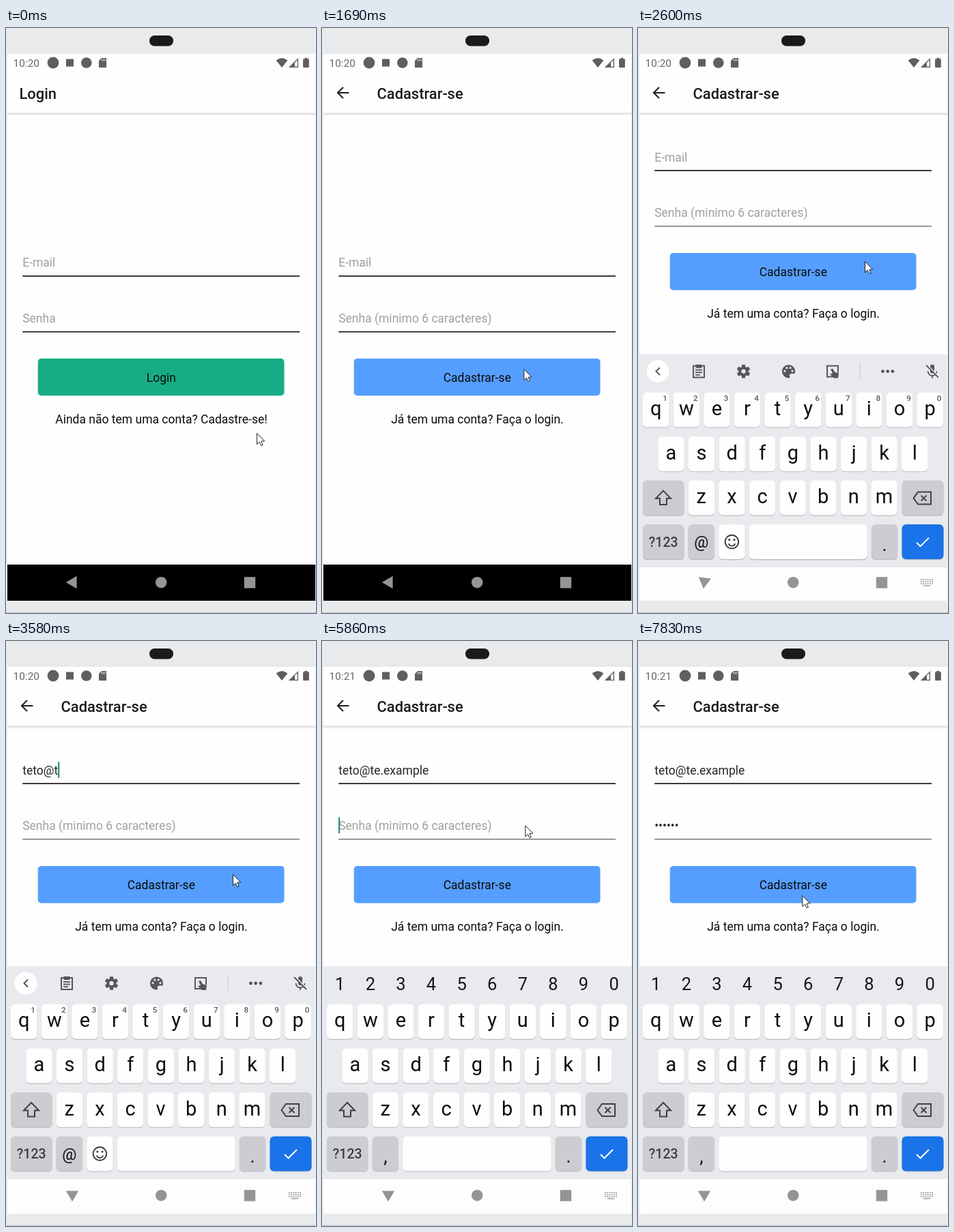
An HTML page with a canvas that plays this animation: 454x858 px, repeating every 8000 ms.

```html
<!DOCTYPE html>
<html lang="pt">
<head>
<meta charset="utf-8">
<title>Login</title>
<style>
html, body { margin: 0; width: 100%; height: 100%; overflow: hidden; background: #e9eaec; }
canvas { display: block; width: 454px; height: 858px; }
</style>
</head>
<body>
<canvas id="stage"></canvas>
<script>
const W = 454, H = 858, LOOP = 8000;
const dpr = window.devicePixelRatio || 1;
const stage = document.getElementById('stage');
const sheet = document.createElement('canvas');
for (const el of [stage, sheet]) { el.width = W * dpr; el.height = H * dpr; }
const main = stage.getContext('2d');
const off = sheet.getContext('2d');
let c = main;

const EMAIL = 'teto@te.example';
const emailKeys = [2760, 2950, 2980, 3150, 3390, 3580, 3760, 3910, 4050, 4120, 4190, 4630, 4730, 4830, 4930];
const passKeys = [6110, 6300, 6440, 6590, 6770, 6870];
const PUSH = 1189, FOCUS = 2020, KEYS_IN = 2510, RELAYOUT = 2570;
const TO_PASS = 5640, NUM_ROW = 5780, CLOCK = 5500, MASK = 7600;
const GREY = '#54565a';

const clamp = x => Math.max(0, Math.min(1, x));
const span = (t, a, b) => clamp((t - a) / (b - a));
const mix = (a, b, p) => a + (b - a) * p;
const inOut = x => x < .5 ? 2 * x * x : 1 - 2 * (1 - x) * (1 - x);
const typed = (keys, t) => keys.filter(k => t >= k).length;

function bezier(x, x1, y1, x2, y2) {
  const at = (s, a, b) => 3 * (1 - s) * (1 - s) * s * a + 3 * (1 - s) * s * s * b + s * s * s;
  let lo = 0, hi = 1;
  for (let i = 0; i < 24; i++) {
    const s = (lo + hi) / 2;
    if (at(s, x1, x2) < x) lo = s; else hi = s;
  }
  return at(lo, y1, y2);
}

// Drawing helpers
function rect(x, y, w, h, fill) { c.fillStyle = fill; c.fillRect(x, y, w, h); }
function round(x, y, w, h, r, fill) {
  c.beginPath(); c.roundRect(x, y, w, h, r);
  c.fillStyle = fill; c.fill();
}
function disc(x, y, r, fill) {
  c.beginPath(); c.arc(x, y, r, 0, 7);
  c.fillStyle = fill; c.fill();
}
function trace(pts, closed) {
  c.beginPath();
  for (let i = 0; i < pts.length; i += 2) c.lineTo(pts[i], pts[i + 1]);
  if (closed) c.closePath();
}
function poly(pts, fill) { trace(pts, true); c.fillStyle = fill; c.fill(); }
function line(pts, color, width, closed) {
  trace(pts, closed);
  c.strokeStyle = color; c.lineWidth = width; c.stroke();
}
function text(s, x, y, size, fill, align = 'left', weight = 400) {
  c.font = `${weight} ${size}px Roboto, sans-serif`;
  c.textAlign = align; c.fillStyle = fill;
  c.fillText(s, x, y);
  return c.measureText(s).width;
}
function at(x, y, draw, angle = 0) {
  c.save(); c.translate(x, y); c.rotate(angle); draw(); c.restore();
}
// Draws a group with one shared opacity.
function layer(alpha, scale, dy, draw) {
  if (alpha <= 0) return;
  off.setTransform(dpr, 0, 0, dpr, 0, 0);
  off.clearRect(0, 0, W, H);
  off.translate(227.5, 412.5 + dy);
  off.scale(scale, scale);
  off.translate(-227.5, -412.5);
  c = off; draw(); c = main;
  c.globalAlpha = alpha;
  c.drawImage(sheet, 0, 0, W, H);
  c.globalAlpha = 1;
}

// App screens
function header(title, back) {
  rect(2, 38, 451, 749, '#fefefe');
  const g = c.createLinearGradient(0, 124.5, 0, 129);
  g.addColorStop(0, '#d9d9d9'); g.addColorStop(1, '#fefefe');
  rect(2, 124.5, 451, 4.5, g);
  text(title, back ? 80.5 : 19.5, 103.5, 21.9, '#1b1b1d', 'left', 500);
  if (back) {
    line([23, 95, 39.5, 95], '#222', 2.1);
    line([31, 87, 23, 95, 31, 103], '#222', 2.1);
  }
}
function field(value, hint, y, caret) {
  const w = value ? text(value, 24.2, y, 17.5, '#262626') : (text(hint, 24.2, y, 17.5, '#a0a0a0'), 0);
  if (caret) rect(24.2 + w, y - 18.3, 2, 23.5, '#16877a');
}
function form(dy, button, color, link, linkAlpha) {
  rect(24.3, 363 + dy, 405.7, 1.6, '#0c0c0c');
  rect(24.3, 444.8 + dy, 405.7, dy ? 1.2 : 1.6, dy ? '#5a5a5a' : '#0c0c0c');
  round(46.7, 484.8 + dy, 360.8, 54.4, 5, color);
  text(button, 227.3, 519 + dy, 17.5, '#0b0b0b', 'center');
  text(link, 227.5, 580 + dy, 17.5, `rgba(12,12,12,${linkAlpha})`, 'center');
}
function loginScreen(t) {
  const fade = t < PUSH
    ? mix(1, .2, inOut(span(t, 910, 1060)))
    : mix(.2, 1, inOut(span(t, PUSH, PUSH + 250)));
  header('Login', false);
  field('', 'E-mail', 350.2, false);
  field('', 'Senha', 431.5, false);
  form(0, 'Login', '#17ad84', 'Ainda não tem uma conta? Cadastre-se!', fade);
}
function signupScreen(t) {
  const dy = t >= RELAYOUT ? -154.7 : 0;
  const n = typed(emailKeys, t), m = typed(passKeys, t);
  const pass = m ? '•'.repeat(m - 1) + (t >= MASK ? '•' : m) : '';
  const caretOff = (t >= 2600 && t < 2760) || (t >= 4470 && t < 4630) || t >= 7210;
  const caret = t >= FOCUS && !caretOff;
  header('Cadastrar-se', true);
  field(EMAIL.slice(0, n), 'E-mail', 350.2 + dy, caret && t < TO_PASS);
  field(pass, 'Senha (minimo 6 caracteres)', 431.5 + dy, caret && t >= TO_PASS);
  form(dy, 'Cadastrar-se', '#559eff', 'Já tem uma conta? Faça o login.', 1);
  if (t >= 2470 && t < RELAYOUT) rect(2, 478, 451, 309, '#fefefe');
}
function app(t) {
  c.save();
  c.beginPath(); c.rect(2, 38, 451, 749); c.clip();
  rect(2, 38, 451, 749, '#fefefe');
  const p = bezier(span(t, PUSH, PUSH + 400), .35, .91, .33, .97);
  if (p < 1) layer(1 - span(p, .2075, 1), 1 + .1 * p, 0, () => loginScreen(t));
  layer(span(p, .75, .875), .85 + .15 * p, 0, () => signupScreen(t));
  c.restore();
}

// Device chrome
function frame() {
  rect(0, 0, W, H, '#e9eaec');
  round(210, 11, 35, 15.5, 7.5, '#1a1b1d');
  rect(0, 856.8, W, 1.2, '#c3c9d2');
}
function statusBar(t) {
  const ink = '#5f5f5f';
  text(t < CLOCK ? '10:20' : '10:21', 10.6, 57, 15.4, '#686868');
  disc(69, 51, 8.4, ink);
  rect(88, 45.5, 11, 11, ink);
  disc(117.8, 51, 7.8, ink);
  poly([140, 44, 147, 44, 147, 58, 136, 58, 136, 48], ink);
  for (let i = 0; i < 3; i++) rect(139.7 + i * 2.3, 45.5, 1.2, 3, '#ddd');
  c.beginPath(); c.moveTo(404, 58);
  c.lineTo(395.6, 47.6);
  c.quadraticCurveTo(404, 40.6, 412.4, 47.6);
  c.closePath(); c.fillStyle = ink; c.fill();
  line([415.5, 57.3, 427.3, 57.3, 427.3, 45.5], ink, 1.3, true);
  poly([414.5, 58, 423, 58, 423, 49.5], ink);
  round(435, 45.3, 8.8, 12.7, 1, ink);
  rect(437.4, 43.8, 4, 2, ink);
}
function navBar(t, light) {
  const ink = '#949494';
  const turn = 1 - Math.exp(-Math.max(0, t - 2530) / 28);
  at(97, 813, () => poly([-9.2, 0, 6.6, -9.2, 6.6, 9.2], ink), -Math.PI / 2 * turn);
  disc(227.2, 813.2, 8.3, ink);
  rect(348.8, 805.2, 16.4, 16.4, ink);
  if (t < KEYS_IN) return;
  const dim = light ? '#a6a6a6' : '#777';
  for (let r = 0; r < 3; r++)
    for (let i = 0; i < 6; i++) rect(414 + i * 3.2, 808 + r * 3, 1.9, 1.9, dim);
  rect(418, 817, 10, 1.6, dim);
}

// Keyboard
function key(x, y, w, fill = '#fefefe') {
  round(x, y + 1.1, w, 51, 6, '#b9bbbf');
  round(x, y, w, 51, 6, fill);
}
function letters(row, x, y, supers) {
  [...row].forEach((ch, i) => {
    const mid = x + i * 44.6;
    key(mid - 19.2, y, 38.4);
    text(ch, mid, y + 33.5, 29, '#0d0d0d', 'center');
    if (supers) text((i + 1) % 10, mid + 13.5, y + 12.5, 11.8, '#5a5c60', 'center', 500);
  });
}
function toolbar() {
  const y = 502;
  disc(29, y, 16.5, '#fefefe');
  line([32, y - 5.5, 26.5, y, 32, y + 5.5], GREY, 2);
  at(89, y, () => {
    line([-8, -8, 8, -8, 8, 9, -8, 9], GREY, 2, true);
    rect(-4.5, -10, 9, 5, GREY);
    for (let i = 0; i < 3; i++) rect(-5, -3 + i * 3.6, i < 2 ? 10 : 7, 1.8, GREY);
  });
  at(154.5, y, () => {
    for (let i = 0; i < 3; i++) {
      c.rotate(Math.PI / 3);
      round(-2.6, -9.8, 5.2, 19.6, 1, GREY);
    }
    disc(0, 0, 7.2, GREY);
    disc(0, 0, 3.2, '#e8eaed');
  });
  at(220.5, y, () => {
    disc(0, 0, 9.6, GREY);
    poly([2, 10, 1, 5, 5, 3, 10, 4, 7, 9], '#e8eaed');
    for (const [x, v] of [[-5.5, -.5], [-2.6, -5], [2.6, -5], [5.5, -.5]]) disc(x, v, 1.6, '#e8eaed');
  });
  at(285, y, () => {
    line([1, 8, -8, 8, -8, -8, 8, -8, 8, 2], GREY, 2);
    poly([-3, -3, 0, -4, 3, 1, 9, 3, 8, 10, 2, 10, -4, 4, 0, 3], GREY);
  });
  rect(324.6, 490, 1.2, 24, '#cdcfd3');
  for (let i = -1; i < 2; i++) disc(365.7 + i * 7.2, y, 2.4, GREY);
  at(431, y, () => {
    round(-3, -10, 6, 13, 3, GREY);
    c.beginPath(); c.arc(0, 0, 6.5, 0, Math.PI);
    c.strokeStyle = GREY; c.lineWidth = 1.8; c.stroke();
    rect(-.9, 6, 1.8, 4, GREY);
    line([-8, -10, 10, 8], '#e8eaed', 2);
    line([-9, -9, 9, 9], GREY, 2);
  });
}
function keyboard(t) {
  const nums = t >= NUM_ROW, dark = '#cccdd1';
  rect(2, 477, 451, 363, '#e8eaed');
  if (nums) [...'1234567890'].forEach((d, i) => text(d, 26.2 + i * 44.6, 512, 25.5, '#161616', 'center'));
  else toolbar();
  letters('qwertyuiop', 26.2, 532.8, !nums);
  letters('asdfghjkl', 48.5, 597.6, false);
  letters('zxcvbnm', 92.8, 662, false);
  key(7, 662, 60.5, dark);
  line([37, 677, 48, 688.5, 42, 688.5, 42, 697.5, 32, 697.5, 32, 688.5, 26, 688.5], '#3f4144', 2, true);
  key(386.5, 662, 61, dark);
  at(416.5, 688, () => {
    line([-13, 0, -6.5, -9, 12.5, -9, 12.5, 9, -6.5, 9], '#3f4144', 2, true);
    line([-2, -4, 6, 4], '#3f4144', 2);
    line([-2, 4, 6, -4], '#3f4144', 2);
  });
  key(7, 726.5, 60.5, dark);
  text('?123', 37.2, 759, 19.5, '#3c3e42', 'center', 500);
  key(73.6, 726.5, 38.4, dark);
  if (nums) {
    text(',', 92.8, 764.5, 27, '#0d0d0d', 'center');
    key(118.2, 726.5, 217.5);
  } else {
    text('@', 92.8, 760.5, 23.5, '#0d0d0d', 'center');
    key(118.2, 726.5, 38.4);
    at(137.4, 752, () => {
      c.strokeStyle = '#3f4144'; c.lineWidth = 1.9;
      c.beginPath(); c.arc(0, 0, 9.8, 0, 7); c.stroke();
      disc(-3.6, -3, 1.6, '#3f4144');
      disc(3.6, -3, 1.6, '#3f4144');
      c.beginPath(); c.arc(0, 1, 5, .3, Math.PI - .3); c.stroke();
    });
    key(162.7, 726.5, 173);
  }
  key(341.8, 726.5, 38.4, dark);
  text('.', 361, 765, 27, '#0d0d0d', 'center');
  key(386.5, 726.5, 61, '#1a73e8');
  line([408, 753, 413.5, 758.5, 426, 746], '#fff', 2.1);
}
function bottom(t) {
  const light = t >= RELAYOUT;
  if (!light) rect(2, 787, 451, 53, '#000');
  if (t >= KEYS_IN) {
    const rest = Math.exp(-(t - KEYS_IN) * .0562);
    const dy = 270 * rest;
    c.save();
    c.beginPath(); c.rect(2, 38, 451, 802); c.clip();
    layer(1 - .87 * rest, 1, dy, () => keyboard(t));
    if (light) {
      rect(2, 787.6 + dy, 451, 53, '#fdfdfd');
      rect(2, 787.6 + dy, 451, 1.4, '#e0e1e3');
    }
    c.restore();
  }
  navBar(t, light);
}

// Pointer stops: start, end, x, y
const moves = [[230, 750, 277.8, 578.5], [1500, 1970, 332.5, 342.5], [5270, 5600, 297.8, 270.8], [7210, 7700, 240.8, 373.5]];
function pointer(t) {
  let x = 367.5, y = 594.5;
  for (const [a, b, mx, my] of moves) {
    const p = inOut(span(t, a, b));
    x = mix(x, mx, p); y = mix(y, my, p);
  }
  at(x, y, () => {
    const arrow = [0, 0, 0, 16, 3.7, 12.6, 6.2, 18, 8.6, 17, 6.2, 11.6, 11.2, 11.4];
    poly(arrow, '#fff');
    line(arrow, '#222', 1, true);
  });
}

function draw(t) {
  main.setTransform(dpr, 0, 0, dpr, 0, 0);
  frame();
  app(t);
  statusBar(t);
  bottom(t);
  pointer(t);
}

const start = performance.now();
function tick() {
  draw((performance.now() - start) % LOOP);
  requestAnimationFrame(tick);
}
tick();
</script>
</body>
</html>
```
